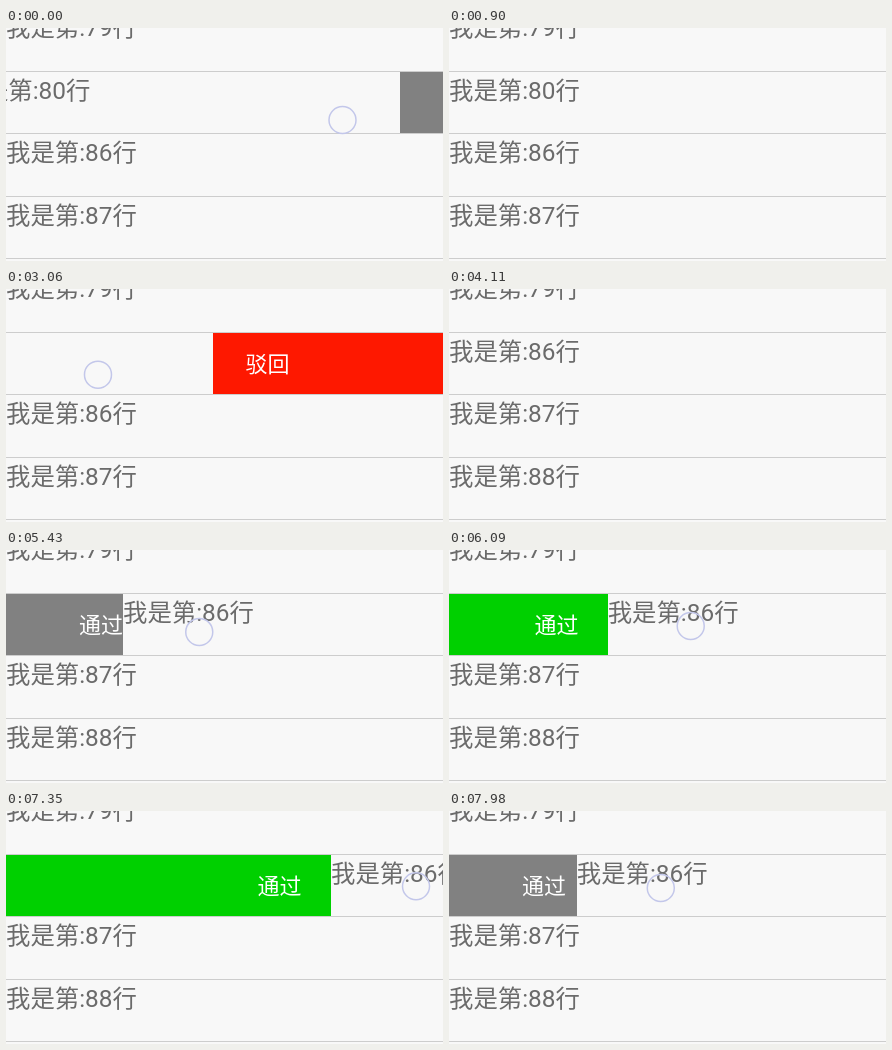
Recreate the animation shown at these times as an HTML page. Size 437 by 233 pixels, loop 8 s.

```html
<!DOCTYPE html>
<html lang="zh">
<head>
<meta charset="utf-8">
<title>Swipe list</title>
<style>
  html, body { margin: 0; width: 100%; height: 100%; overflow: hidden; background: #f8f8f8; }
  svg { display: block; }
  #stage { width: 437px; height: 233px; }
  .label { font: 24.4px Roboto, "Noto Sans CJK SC", "Noto Sans CJK", sans-serif; fill: #6b6b6b; }
  .action { font: 500 22px "Noto Sans CJK SC", "Noto Sans CJK", sans-serif; fill: #fff; }
  #touch { fill: none; stroke: #c3c7ea; stroke-width: 1.5; }
</style>
</head>
<body>
<svg id="stage" viewBox="0 0 437 233">
  <g id="rows"></g>
  <svg id="panel" y="44">
    <rect id="fill" width="437" height="63"/>
    <text id="action" class="action"></text>
  </svg>
  <circle id="touch" r="13.5"/>
</svg>
<script>
const LOOP = 8000, WIDTH = 440.5, ROW = 62.5, TOP = 43;
const TRIGGER = WIDTH / 3;
const REMOVE_START = 3810, REMOVE_END = 4110;
const NS = 'http://www.w3.org/2000/svg';
const $ = id => document.getElementById(id);

// Turning points of the active row: [time, offset]
const swipe = [
  [0, -46.5], [600, -96], [720, -96], [900, 0], [1350, 0],
  [2080, -203], [2600, -112], [3130, -239], [3540, -239], [3690, -WIDTH],
  [REMOVE_END, -WIDTH], [REMOVE_END, 0], [4530, 0], [5150, 157], [5660, 88],
  [6540, 234], [6680, 234], [7150, 325], [7350, 325], [8100, 115]
];
// One list per touch: [time, distance from the row offset, finger height]
const touches = [
  [[0, 383, 92], [600, 386, 100]],
  [[1350, 307, 95], [3390, 327, 85]],
  [[4560, 71, 86.5], [6720, 86, 73.5], [LOOP, 84, 77]]
];

const ease = u => (1 - Math.cos(Math.PI * u)) / 2;

function tween(keys, t, col = 1) {
  const i = keys.findIndex(k => k[0] > t);
  const a = keys[i - 1], b = keys[i];
  return a[col] + (b[col] - a[col]) * ease((t - a[0]) / (b[0] - a[0]));
}

function set(el, attrs) {
  for (const name in attrs) el.setAttribute(name, attrs[name]);
}
function add(parent, tag, attrs) {
  const el = parent.appendChild(document.createElementNS(NS, tag));
  set(el, attrs);
  return el;
}
function show(el, on) {
  el.style.display = on ? '' : 'none';
}

const rows = [79, 80, 86, 87, 88, 89].map(n => {
  const g = add($('rows'), 'g', {});
  add(g, 'rect', { y: 1, width: 437, height: ROW, fill: '#f8f8f8' });
  add(g, 'rect', { width: 437, height: 1, fill: '#cdcdcd' });
  const label = add(g, 'text', { class: 'label' });
  label.textContent = `我是第:${n}行`;
  return { g, label };
});

function drawRows(dx, gone, removed) {
  const active = removed ? 2 : 1;
  rows.forEach(({ g, label }, i) => {
    const y = TOP + ROW * (i - 1 - (i > 1 ? gone : 0));
    const top = Math.round(y - 0.1);
    g.setAttribute('transform', `translate(0 ${top})`);
    set(label, { x: i === active ? dx : 0, y: y - top + 27.5 });
    show(g, !(i === 1 && removed));
  });
}

function drawPanel(dx, height) {
  const left = dx > 0;
  const edge = Math.max(0, Math.round(left ? dx : WIDTH + dx));
  const x = left ? 0 : edge;
  const width = left ? edge : 437 - edge;
  show($('panel'), width > 0 && height > 0);
  set($('panel'), { x, width: Math.max(0, width), height });

  const armed = Math.abs(dx) > TRIGGER;
  $('fill').setAttribute('fill', !armed ? '#818181' : left ? '#00d000' : '#fe1800');
  const textX = left ? Math.max(73, edge - 73.5) : Math.min(326, edge + 32.5);
  set($('action'), { x: textX - x, y: height / 2 + 8 });
  $('action').textContent = left ? '通过' : '驳回';
}

function drawTouch(dx, t) {
  const path = touches.find(k => t >= k[0][0] && t < k[k.length - 1][0]);
  show($('touch'), path);
  if (path) set($('touch'), { cx: dx + tween(path, t), cy: tween(path, t, 2) });
}

function draw(t) {
  const p = Math.min(1, Math.max(0, (t - REMOVE_START) / (REMOVE_END - REMOVE_START)));
  const removed = p === 1;
  const dx = tween(swipe, t);
  const height = removed ? 61 : Math.max(0, Math.round(ROW * (1 - ease(p)) - 1.1));
  drawRows(dx, ease(p), removed);
  drawPanel(dx, height);
  drawTouch(dx, t);
}

const start = performance.now();
function tick() {
  draw((performance.now() - start) % LOOP);
  requestAnimationFrame(tick);
}
tick();
</script>
</body>
</html>
```
